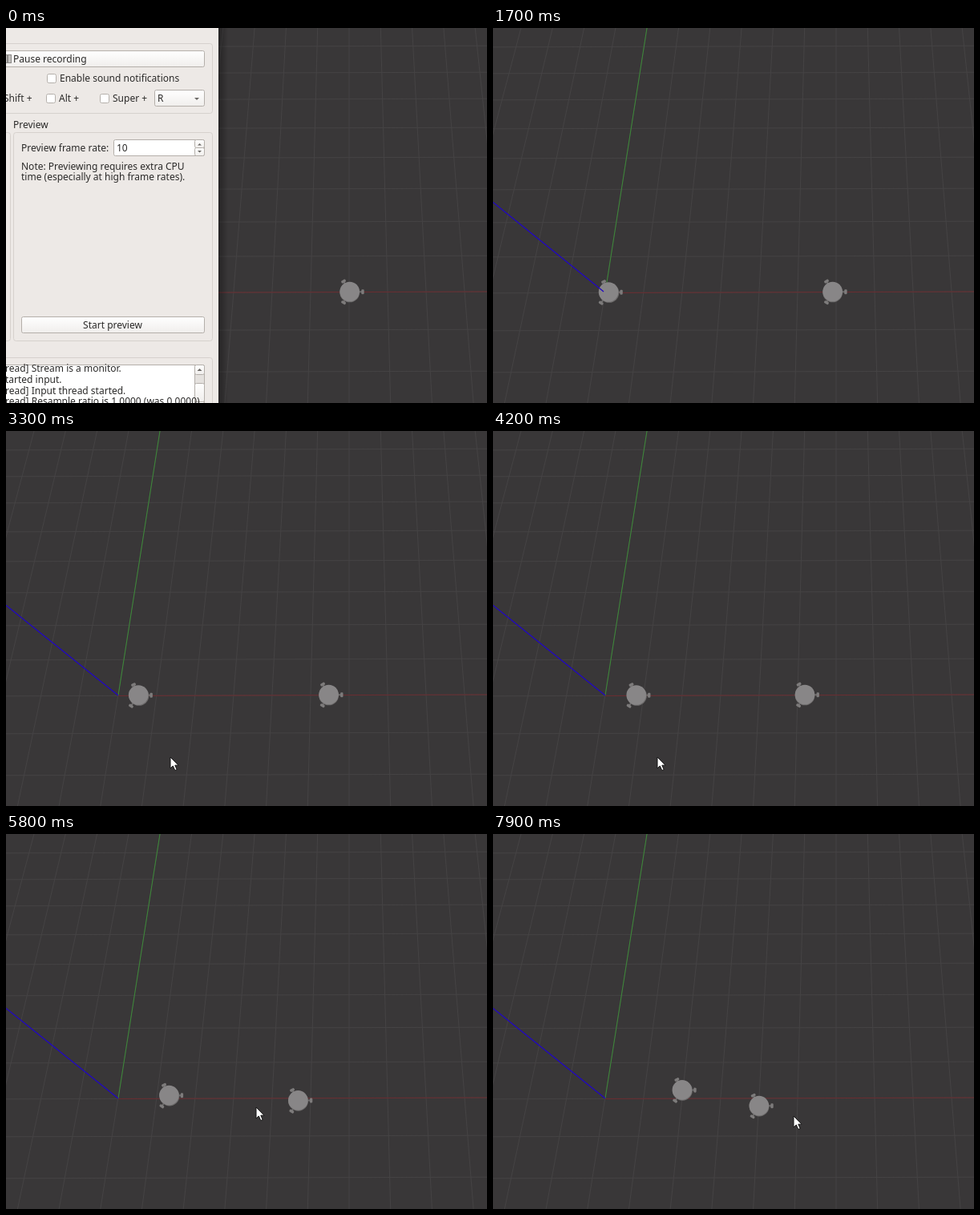
Animation of 600 by 468 pixels, one loop 8 s. Source, as an HTML page:

```html
<!DOCTYPE html>
<html lang="en">
<head>
<meta charset="utf-8">
<title>Two robots approaching</title>
<style>
  html, body { margin: 0; width: 100%; height: 100%; overflow: hidden; background: #393738; }
  svg { display: block; width: 600px; height: 468px; }
  text { font: 12px "Noto Sans", "Open Sans", sans-serif; fill: #2b2a29; white-space: pre; }
</style>
</head>
<body>
<svg id="stage" viewBox="0 0 600 468">
  <defs>
    <linearGradient id="face" x1="0" y1="0" x2="0" y2="1">
      <stop offset="0" stop-color="#fff"/><stop offset="1" stop-color="#f0eeec"/>
    </linearGradient>
    <linearGradient id="shade">
      <stop offset="0" stop-color="#000" stop-opacity=".35"/><stop offset="1" stop-color="#000" stop-opacity="0"/>
    </linearGradient>
  </defs>
  <rect width="600" height="468" fill="#393738"/>
  <g id="grid" stroke="#454344" stroke-width="1"></g>
  <path d="M140 330.5L600 329" stroke="#6b2c30"/>
  <path d="M192 0L140 330" stroke="#3c8a38"/>
  <g id="robots"></g>
  <path id="blueAxis" stroke="#2006c4" stroke-width="1.3"/>
  <g id="panel"></g>
  <path id="cursor" d="M0 0V14L3.3 11L5.8 16.6L8.2 15.6L5.8 10.2H10Z" fill="#fff" stroke="#151515" stroke-width="1"/>
</svg>
<script>
const LOOP = 8000, STEP = 100;
const $ = id => document.getElementById(id);

function add(parent, tag, attrs, content) {
  const el = document.createElementNS("http://www.w3.org/2000/svg", tag);
  for (const key in attrs) el.setAttribute(key, attrs[key]);
  if (content) el.textContent = content;
  return parent.appendChild(el);
}

// Perspective floor: columns fan out around x = 428.
function buildGrid() {
  const grid = $("grid");
  for (let k = -14; k <= 4; k++)
    add(grid, "path", { d: `M${428 + k * 39.3} 0L${428 + k * 51.7} 468` });
  for (const y of [23, 56, 89, 125, 162, 201, 242, 285, 330, 377, 429])
    add(grid, "path", { d: `M0 ${y + .8}L600 ${y - .8}` });
}

function buildPanel() {
  const panel = $("panel");
  const box = (x, y, w, h, fill, stroke = "#b4afaa", rx = 2) =>
    add(panel, "rect", { x: x + .5, y: y + .5, width: w, height: h, rx, fill, stroke });
  const label = (x, y, words, anchor = "start") =>
    add(panel, "text", { x, y, "text-anchor": anchor }, words);
  const arrow = (x, y, up, r = 3) =>
    add(panel, "path", { d: `M${x - r} ${y}h${2 * r}l${-r} ${up ? -r : r}z`, fill: "#6b6865" });
  const group = (x, y, w, h) => box(x, y, w, h, "none", "#d6d1cd", 3);

  add(panel, "rect", { x: 265, y: -25, width: 12, height: 540, fill: "url(#shade)" });
  add(panel, "path", { d: "M-600 -6V-30H259Q265 -30 265 -24V-6Z", fill: "#343231" });
  for (const x of [219, 237, 254])
    add(panel, "circle", { cx: x, cy: -18, r: 5.5, fill: "#4e4b49", stroke: "#63605d" });
  add(panel, "rect", { x: -600, y: -6, width: 865, height: 510, fill: "#ede9e6" });

  group(-500, 19, 757, 87);
  box(-400, 28, 647, 20, "url(#face)");
  for (const x of [-3, 2]) box(x, 33, 4, 10, "#c4c2c0", "#8c8a88", 0);
  label(9, 43, "Pause recording");
  box(51, 57, 11, 11, "#fff");
  label(67, 67, "Enable sound notifications");
  label(-3, 92, "Shift +");
  box(50, 82, 11, 11, "#fff");
  label(66, 92, "Alt +");
  box(117, 82, 11, 11, "#fff");
  label(133, 92, "Super +");
  box(185, 77, 62, 20, "url(#face)");
  label(189, 92, "R");
  arrow(238, 87, false);

  label(9, 125, "Preview");
  group(-500, 130, 505, 260);
  group(9, 130, 248, 260);
  label(19, 154, "Preview frame rate:");
  box(134, 139, 113, 20, "#fff");
  box(235, 139, 12, 10, "url(#face)");
  box(235, 149, 12, 10, "url(#face)");
  label(138, 154, "10");
  arrow(241.5, 146.5, true, 2.5);
  arrow(241.5, 153, false, 2.5);
  label(19, 177, "Note: Previewing requires extra CPU");
  label(19, 190, "time (especially at high frame rates).");
  box(19, 360, 228, 20, "url(#face)");
  label(133, 375, "Start preview", "middle");

  group(-500, 411, 757, 80);
  box(-400, 420, 647, 58, "#fff");
  box(235, 420, 12, 58, "#e4e1de");
  box(235, 420, 12, 12, "url(#face)");
  box(235, 443, 12, 23, "url(#face)");
  box(235, 466, 12, 12, "url(#face)");
  arrow(241.5, 428, true);
  arrow(241.5, 470, false);
  label(-1, 429, "read] Stream is a monitor.");
  label(-1, 443, "tarted input.");
  label(-1, 457, "read] Input thread started.");
  label(-1, 470, "read] Resample ratio is 1.0000 (was 0.0000).");
}

function makeRobot() {
  const root = add($("robots"), "g", {});
  const wheels = [0, 1, 2].map(() => {
    const g = add(root, "g", {});
    add(g, "path", { d: "M-6 0H0", stroke: "#6f6d6d", "stroke-width": 2 });
    add(g, "rect", { x: -1.6, y: -3, width: 3.4, height: 6, rx: 1.3, fill: "#7d7b7b" });
    return g;
  });
  const rim = add(root, "circle", { r: 12.4, fill: "#6d6b6b" });
  add(root, "circle", { r: 12.3, fill: "#888687" });
  return (x, y) => {
    const lean = (428.5 - x) / 290;
    const feet = [[16.2 - lean * .3, .2], [-7.6 + 1.7 * lean, -12.8], [-7.6 - 1.7 * lean, 13.6]];
    root.setAttribute("transform", `translate(${x} ${y})`);
    rim.setAttribute("cx", .8 * lean);
    rim.setAttribute("cy", .9);
    wheels.forEach((wheel, i) => {
      const [fx, fy] = feet[i], turn = Math.atan2(fy, fx) * 180 / Math.PI;
      wheel.setAttribute("transform", `translate(${fx} ${fy}) rotate(${turn})`);
    });
  };
}

// Distance covered when speed rises smoothly to v after the start time.
function travel(t, start, v, tau) {
  const s = Math.max(0, t - start);
  return v * (s - tau * (1 - Math.exp(-s / tau)));
}

// Stops of the pointer: seconds, x, y.
const pointerPath = [
  [0, 225, -30], [.1, 225, -30], [.4, 69, 408], [.6, 45, 490],
  [2.3, 180, 490], [2.4, 190, 470], [2.5, 198, 438], [2.6, 205, 407],
  [5.3, 205, 407], [5.4, 225, 419], [5.6, 312, 341],
  [7.3, 312, 341], [7.6, 375, 352], [8, 375, 352]
];

function pointerAt(t) {
  const i = Math.max(1, pointerPath.findIndex(p => p[0] >= t));
  const [t0, x0, y0] = pointerPath[i - 1], [t1, x1, y1] = pointerPath[i];
  const k = (t - t0) / (t1 - t0);
  return [x0 + (x1 - x0) * k, y0 + (y1 - y0) * k];
}

buildGrid();
buildPanel();
const leftRobot = makeRobot(), rightRobot = makeRobot();

function draw(ms) {
  const t = Math.floor(ms % LOOP / STEP) * STEP / 1000;
  const along = travel(t, .85, 15.5, .8), aside = travel(t, 4.35, 3.2, .4);
  leftRobot(139 + along, 329.5 - aside);
  rightRobot(428.7 - along, 329 + aside);
  $("blueAxis").setAttribute("d", t < 2.3 ? "M0 217.5L138 329" : "M0 217.5L140 330");

  // The window zooms away towards a point off the lower left.
  const scale = 1 - (Math.max(0, t - .1) / .5) ** 2;
  $("panel").setAttribute("display", scale > .3 ? "inline" : "none");
  $("panel").setAttribute("transform", `translate(${-258 * (1 - scale)} ${451 * (1 - scale)}) scale(${scale})`);
  $("cursor").setAttribute("transform", `translate(${pointerAt(t)})`);
}

const begin = performance.now();
function tick() {
  draw(performance.now() - begin);
  requestAnimationFrame(tick);
}
tick();
</script>
</body>
</html>
```
